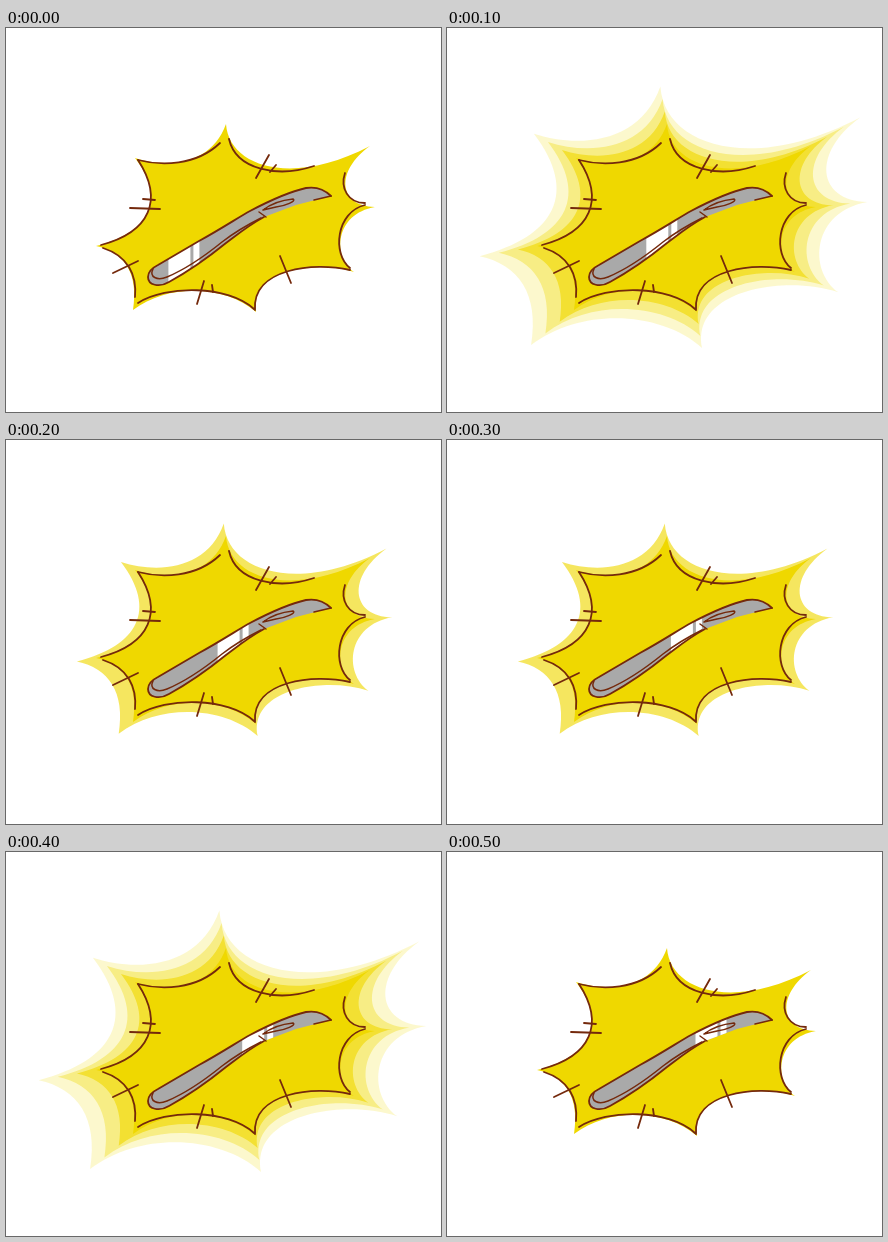
These frames come from a looping animation (435 px wide and 384 px high, 0.55 s). An HTML page:

```html
<!DOCTYPE html>
<html lang="en">
<head>
<meta charset="utf-8">
<title>Scalpel burst</title>
<style>
  html, body { margin: 0; width: 100%; height: 100%; overflow: hidden; background: #fff; }
  svg { display: block; width: 435px; height: 384px; }
  .ink { fill: none; stroke: #74290c; stroke-width: 1.8; stroke-linecap: round; stroke-linejoin: round; }
  .fine { stroke-width: 1.5; }
</style>
</head>
<body>
<svg viewBox="0 0 435 384">
  <defs>
    <path id="burst" d="M220 96C223 139 286 159 364 118C329 143 332 178 369 179C329 186 326 228 348 244C308 231 242 243 250 284C221 258 164 254 127 282C133 245 118 224 90 218C145 204 161 172 129 130C163 141 206 136 220 96Z"/>
    <path id="knife" d="M258 189C243 197 232 206 220 215C204 228 183 243 163 254C153 260 142 257 142 249C142 243 146 240 152 237L193 213C215 201 233 189 244 183C263 173 282 164 300 160C312 158 319 162 325 168L290 177"/>
    <clipPath id="clip"><use href="#knife"/></clipPath>
  </defs>
  <g id="glow" fill="#efd800"></g>
  <use href="#burst" fill="#efd800"/>
  <g class="ink">
    <path d="M132 132C155 138 190 138 214 115M223 111C230 142 272 150 308 138"/>
    <path d="M339 145C334 160 342 175 359 175M359 177C330 184 326 226 344 240"/>
    <path d="M344 242C308 234 246 240 249 282M132 275C160 257 222 257 248 281"/>
    <path d="M97 220C122 228 131 247 129 269M132 132C158 172 144 204 95 217"/>
    <path d="M263 127L250 150M270 137L264 144M137 171L149 172M124 180L154 181"/>
    <path d="M107 245L132 233M198 253L191 276M206 257L207 264M274 228L285 255"/>
  </g>
  <use href="#knife" fill="#a9a9a9"/>
  <g clip-path="url(#clip)">
    <path id="shine" fill="#fff" d="M0 140H22V270H0ZM25 140H31V270H25Z"/>
  </g>
  <g class="ink">
    <path d="M258 189C243 197 232 206 220 215C204 228 183 243 163 254C153 260 142 257 142 249C142 243 146 240 152 237L193 213C215 201 233 189 244 183C263 173 282 164 300 160C312 158 319 162 325 168"/>
    <path class="fine" d="M147 241C143 249 151 253 161 249C180 241 200 227 216 214C229 204 243 196 255 190"/>
    <path class="fine" d="M253 184L260 189M257 182C266 175 277 172 287 171C291 173 279 178 270 179L257 182M325 168L308 172"/>
  </g>
</svg>
<script>
const STEP = 50, STEPS = 11, RINGS = 3;
const shine = document.getElementById("shine");

// Rings are translucent enlargements of the burst about its centre, the widest one faintest.
const rings = [];
for (let n = 1; n <= RINGS; n++) {
  const ring = document.createElementNS("http://www.w3.org/2000/svg", "use");
  ring.setAttribute("href", "#burst");
  ring.setAttribute("transform", `translate(237 192) scale(${1 + 0.13 * n}) translate(-237 -192)`);
  ring.setAttribute("fill-opacity", 1.12 * 0.56 ** n);
  document.getElementById("glow").append(ring);
  rings.push(ring);
}

// Two swells, mirrored about the middle of the loop; dark at both ends.
const glowLevel = i => i % 10 ? 3 - Math.abs(3 - Math.abs(i - 5)) : 0;

// The shine jumps in after the first step, then moves on every second step.
const shineX = i => 187 + 12.3 * (i ? Math.floor(i / 2) : -2);

const start = performance.now();
function draw(now) {
  const i = Math.floor(Math.max(0, now - start) / STEP) % STEPS;
  rings.forEach((ring, n) => ring.setAttribute("visibility", n < glowLevel(i) ? "visible" : "hidden"));
  shine.setAttribute("transform", `translate(${shineX(i)} 0)`);
  requestAnimationFrame(draw);
}
draw(start);
</script>
</body>
</html>
```
